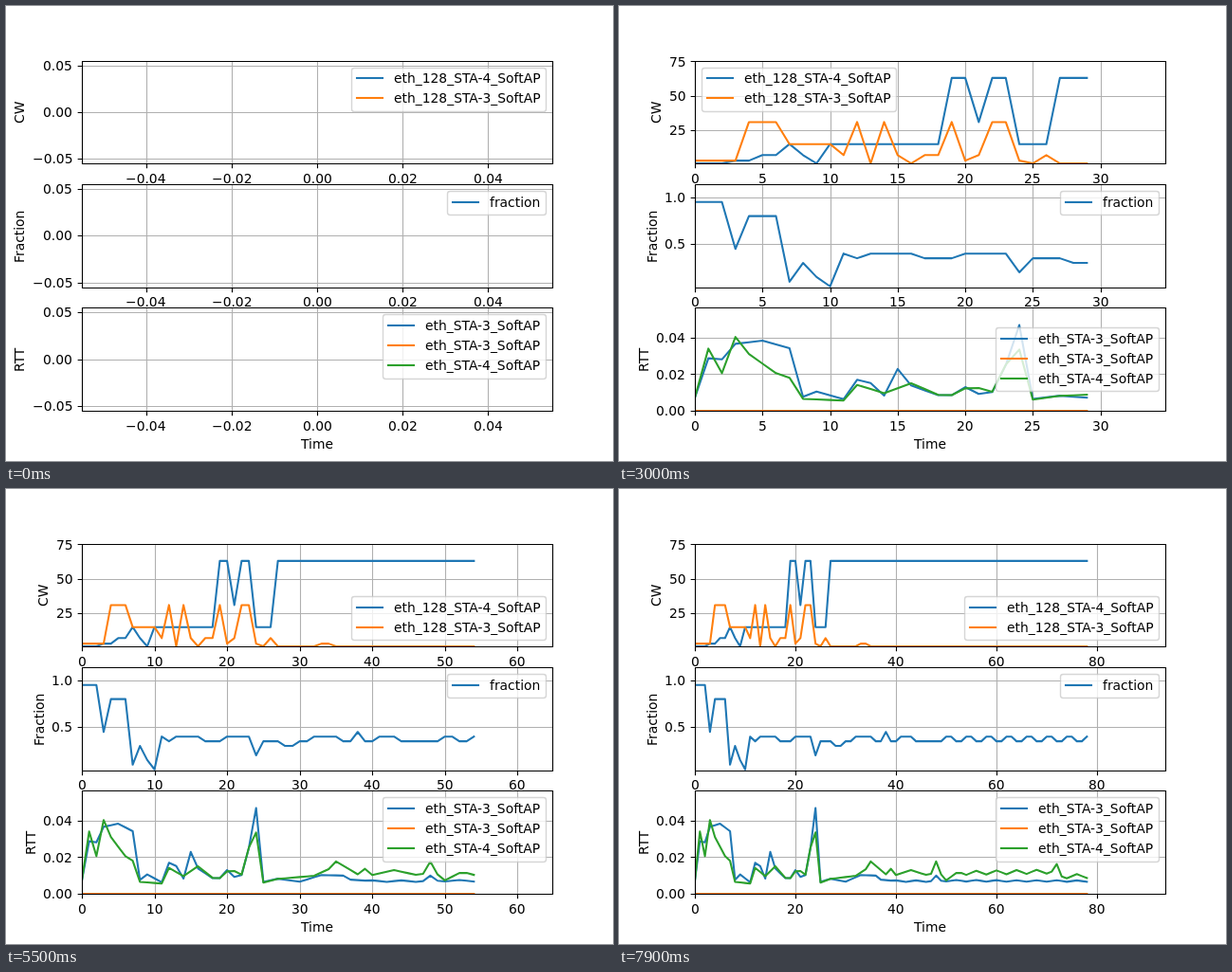
An HTML page that plays this animation: 640 px wide and 480 px high, repeating every 8 s.

```html
<!DOCTYPE html>
<html lang="en">
<head>
<meta charset="utf-8">
<title>Live plots</title>
<style>
  html, body { margin: 0; width: 100%; height: 100%; overflow: hidden; background: #fff; }
  svg { display: block; }
  text { font: 13.889px "DejaVu Sans", sans-serif; white-space: pre; }
</style>
</head>
<body>
<svg id="stage" width="640" height="480" viewBox="0 0 640 480"></svg>
<script>
const EM = 13.889, LEFT = 80, RIGHT = 576, HEIGHT = 108.706, GAP = 130.447, TOP = 57.6;
const ROW = 14.1, ROW_GAP = EM / 2, LABEL_END = 70.28;
const BLUE = '#1f77b4', ORANGE = '#ff7f0e', GREEN = '#2ca02c';
const STEP_MS = 100, STEPS = 80;

// Key points are [time, value] pairs; hold keeps a value, glide joins them with straight lines.
const hold = keys => x => keys.findLast(k => k[0] <= x)[1];
const glide = keys => x => {
  const i = Math.max(1, keys.findIndex(k => k[0] >= x));
  const [x0, y0] = keys[i - 1], [x1, y1] = keys[i];
  return y0 + (y1 - y0) * (x - x0) / (x1 - x0);
};
// The window doubles on each failure: 1, 3, 7, 15, 31, 63.
const backoff = keys => x => 2 ** hold(keys)(x) - 1;
const ripple = (x, from, size) => x < from ? 0 : size * Math.cos(x * Math.PI / 2);

const cw4 = backoff([[0, 1], [3, 2], [5, 3], [7, 4], [8, 3], [9, 1], [10, 4], [19, 6], [21, 5], [22, 6], [24, 4], [27, 6]]);
const cw3 = backoff([[0, 2], [4, 5], [7, 4], [11, 3], [12, 5], [13, 1], [14, 5], [15, 3], [16, 1], [17, 3],
  [19, 5], [20, 2], [21, 3], [22, 5], [24, 2], [25, 1], [26, 3], [27, 1], [33, 2], [35, 1]]);

const earlyFraction = hold([[0, .95], [3, .45], [4, .8], [7, .1], [8, .3], [9, .15], [10, .05], [11, .4], [12, .35],
  [13, .4], [17, .35], [20, .4], [24, .2], [25, .35], [28, .3], [30, .35], [32, .4], [36, .35], [38, .45],
  [39, .35], [41, .4], [44, .35]]);
const fraction = x => x < 48 ? earlyFraction(x) : x % 4 < 2 ? .35 : .4;

const base3 = glide([[0, 73], [1, 287], [2, 281], [3, 366], [5, 383], [7, 342], [8, 77], [9, 106], [11, 64],
  [12, 170], [13, 152], [14, 84], [15, 229], [16, 139], [18, 86], [19, 86], [20, 130], [21, 93], [22, 103],
  [23, 250], [24, 468], [25, 66], [27, 83], [30, 67], [33, 103], [36, 100], [37, 78], [40, 70],
  [47, 70], [48, 96], [49, 72], [78, 70]]);
const base4 = glide([[0, 73], [1, 340], [2, 206], [3, 403], [4, 310], [6, 206], [7, 181], [8, 66], [11, 57],
  [12, 142], [14, 97], [16, 151], [18, 88], [19, 86], [20, 123], [21, 125], [22, 105], [23, 252], [24, 335],
  [25, 62], [27, 82], [32, 99], [34, 135], [35, 177], [38, 107], [39, 137], [40, 103], [43, 130], [46, 104],
  [47, 110], [48, 177], [49, 106], [50, 74], [52, 114], [71, 122], [72, 152], [73, 95], [78, 98]]);
const rtt3 = x => (base3(x) + ripple(x, 40, 4)) * 1e-4;
const rtt4 = x => (base4(x) + ripple(x, 53, 11)) * 1e-4;

const series = (name, color, rule) => ({ name, color, data: Array.from({ length: STEPS - 1 }, (_, x) => rule(x)) });
const plots = [
  { label: 'CW', lines: [series('eth_128_STA-4_SoftAP', BLUE, cw4), series('eth_128_STA-3_SoftAP', ORANGE, cw3)] },
  { label: 'Fraction', lines: [series('fraction', BLUE, fraction)] },
  { label: 'RTT', lines: [series('eth_STA-3_SoftAP', BLUE, rtt3), series('eth_STA-3_SoftAP', ORANGE, () => 0),
    series('eth_STA-4_SoftAP', GREEN, rtt4)] }
];
plots.forEach((p, i) => { p.top = TOP + i * GAP; p.bottom = p.top + HEIGHT; });

const pen = document.createElement('canvas').getContext('2d');
const textWidth = s => {
  pen.font = '13.889px "DejaVu Sans", sans-serif';
  return pen.measureText(s).width;
};
const snap = v => Math.floor(v + .5) + .5;
const path = (d, color, width, extra = '') =>
  `<path d="${d}" fill="none" stroke="${color}" stroke-width="${width}" ${extra}/>`;
// Text starts on whole pixels.
const text = (s, x, y) => `<text x="${Math.round(x)}" y="${Math.round(y)}">${s}</text>`;
const centred = (s, x, y) => text(s, x - textWidth(s) / 2, y);

// Round tick steps: the coarsest allowed one that still gives two ticks.
function ticks(lo, hi, bins) {
  const raw = (hi - lo) / bins;
  const base = 10 ** Math.floor(Math.log10(raw));
  const steps = [.1, .2, .25, .5, 1, 2, 2.5, 5, 10, 20].map(s => s * base);
  let i = steps.findIndex(s => s >= raw * (1 - 1e-9));
  for (; ; i--) {
    const step = steps[i], first = Math.ceil(lo / step - 1e-9), last = Math.floor(hi / step + 1e-9);
    if (last - first < 1 && i > 0) continue;
    let digits = 0;
    while (Math.abs(step * 10 ** digits - Math.round(step * 10 ** digits)) > 1e-6) digits++;
    return Array.from({ length: last - first + 1 }, (_, n) => {
      const value = (first + n) * step;
      return { value, label: (value < 0 ? '\u2212' : '') + Math.abs(value).toFixed(digits) };
    });
  }
}

function crosses([ax, ay], [bx, by], r) {
  let t0 = 0, t1 = 1;
  const dx = bx - ax, dy = by - ay;
  for (const [p, q] of [[-dx, ax - r.x], [dx, r.x + r.w - ax], [-dy, ay - r.y], [dy, r.y + r.h - ay]]) {
    if (p === 0) { if (q < 0) return false; }
    else if (p < 0) t0 = Math.max(t0, q / p);
    else t1 = Math.min(t1, q / p);
  }
  return t0 <= t1;
}

// Picks the legend place that hides the fewest points and lines.
function legendBox(plot, curves) {
  const n = plot.lines.length, pad = EM / 2;
  const w = Math.ceil(Math.max(...plot.lines.map(l => textWidth(l.name)))) + 3.6 * EM;
  const h = .8 * EM + n * ROW + (n - 1) * ROW_GAP;
  const xs = [LEFT + pad, (LEFT + RIGHT - w) / 2, RIGHT - pad - w];
  const ys = [plot.top + pad, (plot.top + plot.bottom - h) / 2, plot.bottom - pad - h];
  const places = [[2, 0], [0, 0], [0, 2], [2, 2], [2, 1], [0, 1], [1, 2], [1, 0], [1, 1]];
  let best, least = Infinity;
  for (const [cx, cy] of places) {
    const r = { x: xs[cx], y: ys[cy], w, h };
    let cost = 0;
    for (const pts of curves) {
      cost += pts.filter(([x, y]) => x > r.x && x < r.x + w && y > r.y && y < r.y + h).length;
      if (pts.some((p, i) => i && crosses(pts[i - 1], p, r))) cost++;
    }
    if (cost < least) { least = cost; best = r; }
  }
  return best;
}

function drawLegend(plot, curves) {
  const r = legendBox(plot, curves), x = snap(r.x), y = snap(r.y);
  let out = `<rect x="${x}" y="${y}" width="${snap(r.x + r.w) - x}" height="${snap(r.y + r.h) - y}" rx="2.78"
    fill="#fff" stroke="#ccc" stroke-width="1.389" opacity=".8"/>`;
  plot.lines.forEach((line, i) => {
    const base = Math.round(r.y + 16.6 + i * (ROW + ROW_GAP)), hx = Math.round(r.x + .4 * EM);
    out += path(`M${hx} ${base - 5}h27`, line.color, 2.083, 'stroke-linecap="square"');
    out += text(line.name, Math.ceil(r.x + 3.2 * EM), base);
  });
  return out;
}

function drawPlot(plot, index, count) {
  const { top, bottom } = plot, last = count - 1;
  let x0 = -.055, x1 = .055, y0 = -.055, y1 = .055;
  if (count) {
    const seen = plot.lines.flatMap(l => l.data.slice(0, count));
    [x0, x1] = last ? [0, last * 1.2] : [-.05, .05];
    y0 = Math.min(...seen) * .8;
    y1 = Math.max(...seen) * 1.2;
  }
  const px = v => LEFT + (v - x0) / (x1 - x0) * (RIGHT - LEFT);
  const py = v => bottom - (v - y0) / (y1 - y0) * HEIGHT;
  const l = snap(LEFT), r = snap(RIGHT), t = snap(top), b = snap(bottom);

  let grid = '', marks = '', labels = '', widest = 0;
  for (const { value, label } of ticks(x0, x1, 9)) {
    const x = snap(px(value));
    grid += `M${x} ${t}V${b}`;
    marks += `M${x} ${b}v4.86`;
    labels += centred(label, px(value), bottom + 20.4);
  }
  for (const { value, label } of ticks(y0, y1, 3)) {
    const y = snap(py(value)), width = textWidth(label);
    grid += `M${l} ${y}H${r}`;
    marks += `M${l} ${y}h-4.86`;
    labels += text(label, LABEL_END - width, py(value) + 5.06);
    widest = Math.max(widest, width);
  }
  const lx = Math.round(LABEL_END - widest - 8.56);
  const ly = Math.ceil((top + bottom + textWidth(plot.label)) / 2);
  labels += `<g transform="translate(${lx} ${ly}) rotate(-90)">${text(plot.label, 0, 0)}</g>`;

  const curves = plot.lines.map(line => line.data.slice(0, count).map((v, i) => [px(i), py(v)]));
  const drawn = curves.map((pts, i) => {
    if (pts.length < 2) return '';
    const flat = pts.every(p => p[1] === pts[0][1]);
    const d = 'M' + pts.map(([x, y]) => `${x.toFixed(2)} ${flat ? Math.round(y) : y.toFixed(2)}`).join('L');
    return path(d, plot.lines[i].color, 2.083, 'stroke-linejoin="round" stroke-linecap="square"');
  }).join('');

  const clipTop = Math.round(top);
  return `<clipPath id="clip${index}"><rect x="${LEFT}" y="${clipTop}" width="${RIGHT - LEFT}"
      height="${Math.round(bottom) - clipTop}"/></clipPath>`
    + path(grid, '#b0b0b0', 1.111)
    + `<g clip-path="url(#clip${index})">${drawn}</g>`
    + path(marks, '#000', 1.111)
    + path(`M${l} ${t}H${r}V${b}H${l}Z`, '#000', 1.111)
    + labels + drawLegend(plot, curves);
}

const stage = document.getElementById('stage');
const start = performance.now();
let shown = -1;

function update(now) {
  const step = Math.floor(Math.max(0, now - start) / STEP_MS) % STEPS;
  if (step !== shown) {
    shown = step;
    stage.innerHTML = plots.map((p, i) => drawPlot(p, i, step)).join('') + centred('Time', 328, 467);
  }
  requestAnimationFrame(update);
}
update(start);
</script>
</body>
</html>
```
